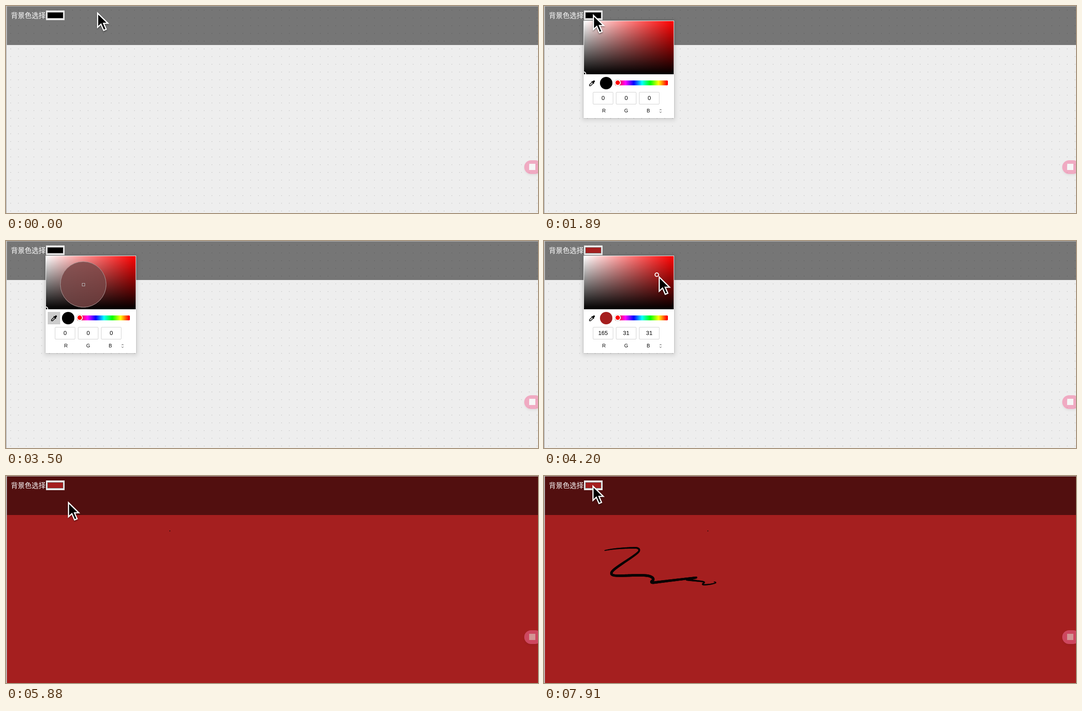
An HTML page with a canvas that plays this animation: 1198x467 px, repeating every 8 s.

```html
<!DOCTYPE html>
<html lang="zh-CN">
<head>
<meta charset="utf-8">
<title>背景色选择</title>
<style>
html, body { margin: 0; width: 100%; height: 100%; overflow: hidden; }
#stage { position: relative; width: 1198px; height: 467px; overflow: hidden; background: #eee; }
#stage * { position: absolute; box-sizing: border-box; }
#board { left: 0; top: 0; }
#header { left: 0; top: 0; width: 1198px; height: 88px; background: rgba(0,0,0,.5); }
#topline { left: 0; top: 0; width: 1198px; height: 1px; background: #bdbdbd; }
#edge { left: 0; top: 0; width: 2px; height: 467px; background: linear-gradient(90deg, #aaa 1px, #dcdcdc 1px); }
#label { left: 11px; top: 9px; font: 15.6px/23px "Noto Sans CJK SC", "Noto Sans CJK", sans-serif; color: #fff; white-space: nowrap; }
#input { left: 90px; top: 10px; width: 42px; height: 22px; background: #efefef; border: 1px solid #ddd; }
#swatch { left: 2px; top: 3px; width: 36px; height: 14px; border: 1px solid #777; }
#pill { left: 1167px; top: 348px; width: 40px; height: 31px; border-radius: 16px; background: #f26d9b; opacity: .52; box-shadow: 0 3px 5px rgba(0,0,0,.12); }
#pill i { left: 11px; top: 8px; width: 14px; height: 14px; background: #fff; }
#picker { left: 89px; top: 33px; width: 204px; height: 220px; background: #fff; box-shadow: 0 0 2px rgba(0,0,0,.35), 0 2px 9px 3px rgba(0,0,0,.11); font-family: "Liberation Sans", Arial, sans-serif; color: #000; }
.tone { background: linear-gradient(to top, #000, transparent), linear-gradient(to right, #fff, transparent), linear-gradient(red, red); background-repeat: no-repeat; }
#tone { left: 1px; top: 1px; width: 202px; height: 120px; overflow: hidden; }
#mark { width: 10px; height: 10px; margin: -5px; border: 2px solid #fff; border-radius: 50%; }
#dropper { left: 5px; top: 127px; width: 28px; height: 28px; }
#dropper svg { left: 0; top: 0; }
#sample { left: 37px; top: 127px; width: 28px; height: 28px; border-radius: 50%; }
#hue { left: 71px; top: 135px; width: 119px; height: 11px; border-radius: 2px; background: linear-gradient(90deg, red 4%, #f0f, #00f, #0ff, #0f0, #ff0, red 98%); }
#thumb { left: 70px; top: 133px; width: 14px; height: 14px; border: 2px solid #fff; border-radius: 50%; background: red; box-shadow: 0 0 2px rgba(0,0,0,.45); }
.field { top: 161px; width: 46px; height: 28px; border: 1px solid #d0d0d0; border-radius: 2px; font-size: 13px; line-height: 26px; text-align: center; }
.name { top: 196px; width: 20px; font-size: 11px; line-height: 14px; text-align: center; }
#arrows { left: 169px; top: 198px; }
#lens { left: 0; top: 0; width: 104px; height: 104px; border: 1px solid #a49696; border-radius: 50%; background-color: #ccc; background-size: 1212px 720px; }
#lens i { left: 48px; top: 48px; width: 7px; height: 7px; border: 1px solid #bbb; }
#cursor { left: 0; top: 0; overflow: visible; filter: drop-shadow(0 2px 1.5px rgba(0,0,0,.4)); }
</style>
</head>
<body>
<div id="stage">
  <canvas id="board" width="1198" height="467"></canvas>
  <div id="header"></div>
  <div id="topline"></div>
  <div id="edge"></div>
  <div id="label">背景色选择</div>
  <div id="input"><div id="swatch"></div></div>
  <div id="pill"><i></i></div>
  <div id="picker">
    <div id="tone" class="tone"><div id="mark"></div></div>
    <div id="dropper"><svg width="28" height="28" fill="none" stroke="#000" stroke-width="1.5">
      <path d="M14.5 11.5 L8.5 17.5 V20 H11 L17 14"/>
      <path d="M13.5 10 L18.5 15 M16 12.5 L18.5 10" stroke-width="2.2"/>
      <path d="M17 11.5 L18.6 9.9" stroke-width="4" stroke-linecap="round"/></svg></div>
    <div id="sample"></div>
    <div id="hue"></div>
    <div id="thumb"></div>
    <svg id="arrows" width="10" height="12" fill="none" stroke="#222"><path d="M2.5 4 L4.5 2 L6.5 4 M2.5 7.5 L4.5 9.5 L6.5 7.5"/></svg>
  </div>
  <div id="lens" class="tone"><i></i></div>
  <svg id="cursor" width="30" height="48"><path d="M1.3 3.2 V35 L8.8 28 L14.9 42 L20.6 39.5 L14.7 26 H24.5 Z" stroke="#fff" stroke-width="2.6"/></svg>
</div>
<script>
const LOOP = 8000, TICK = 70;
const OPEN = 1890, HOVER = 2870, LENS = 3080, PICK = 3920, CLOSE = 5040, FILL = 5110;
const DRAW = 6370, DONE = 7070;
const RED = [165, 31, 31], BLACK = [0, 0, 0];
const $ = id => document.getElementById(id);
const ctx = $('board').getContext('2d');
const rgb = c => `rgb(${c})`;
const show = (el, on) => el.style.visibility = on ? 'visible' : 'hidden';
const place = (el, x, y) => el.style.transform = `translate(${x}px,${y}px)`;

const fields = [...'RGB'].map((letter, i) => {
  const add = (cls, left, text) => {
    const el = document.createElement('div');
    el.className = cls;
    el.style.left = left + 'px';
    el.textContent = text;
    return $('picker').appendChild(el);
  };
  add('name', 36 + 50 * i, letter);
  return add('field', 21 + 52 * i, 0);
});

// time, x, y of the pointer tip
const pointer = [
  [0, 205, 13], [70, 202, 13], [700, 110, 18], [2170, 110, 18], [2450, 150, 105], [2660, 154, 168],
  [2800, 128, 184], [2940, 106, 172], [3080, 106, 172]
];
const lensPath = [[3080, 108, 170], [3500, 174, 98], [3850, 255, 77], [3920, 255, 77]];
const leave = [[3920, 255, 77], [4130, 255, 77], [4830, 368, 121], [5460, 368, 121],
  [5880, 139.5, 57], [6300, 136, 147], [6370, 137, 165]];
const back = [[7070, 386, 236], [7140, 402, 228], [7420, 285, 130], [7840, 109, 20], [8000, 109, 20]];

// Smooth path through timed points; the tangent is flat wherever the pointer rests.
function along(points, t) {
  const last = points.length - 1;
  if (t <= points[0][0]) return points[0].slice(1);
  if (t >= points[last][0]) return points[last].slice(1);
  const i = points.findIndex(p => p[0] > t) - 1;
  const a = points[i], b = points[i + 1], span = b[0] - a[0], u = (t - a[0]) / span;
  const slope = (k, d) => {
    const p = points[k - 1], c = points[k], n = points[k + 1];
    if (!p || !n || p[d] === c[d] || c[d] === n[d]) return 0;
    return (n[d] - p[d]) / (n[0] - p[0]);
  };
  return [1, 2].map(d =>
    a[d] + (b[d] - a[d]) * u * u * (3 - 2 * u) +
    span * u * (1 - u) * ((1 - u) * slope(i, d) - u * slope(i + 1, d)));
}

const ink = document.createElementNS('http://www.w3.org/2000/svg', 'path');
ink.setAttribute('d', `M137 168 C160 163 190 162 206 162 C215 162 217 168 211 173
  C195 187 160 206 153 216 C148 224 158 225 168 225 C190 225 225 222 238 226
  C249 230 247 235 242 238 C241 242 247 240.5 255 239.5 L343 229 C335 232 327 233 321 234
  C335 236 355 237 360 239 C364 241 354 243 358 245 C365 246 380 244 387 241 Q387 239 383 239`);
const inkLength = ink.getTotalLength();
const stamps = Array.from({ length: Math.ceil(inkLength) }, (_, s) => {
  const p = ink.getPointAtLength(s);
  return [p.x, p.y, 1 + 1.9 * Math.sin(Math.PI * s / inkLength) ** .8];
});

function dot(x, y, r) {
  ctx.beginPath();
  ctx.arc(x, y, r, 0, 7);
  ctx.fill();
}

function paintBoard(t) {
  ctx.clearRect(0, 0, 1198, 467);
  if (t < FILL) {
    ctx.fillStyle = '#b4b4b4';
    for (let y = 9.6; y < 467; y += 17.42)
      for (let x = 10.5; x < 1198; x += 17.43) dot(x, y, .75);
    return;
  }
  ctx.fillStyle = rgb(RED);
  ctx.fillRect(0, 0, 1198, 467);
  ctx.fillStyle = '#0a0505';
  dot(369, 124, .9);
  const drawn = Math.min(1, (t - DRAW) / (DONE - DRAW)) * stamps.length;
  for (let s = 0; s < drawn; s++) dot(...stamps[s]);
}

function pointerAt(t) {
  if (t < PICK) return along(pointer, t);
  if (t < DRAW) return along(leave, t);
  if (t >= DONE) return along(back, t);
  const p = ink.getPointAtLength((t - DRAW) / (DONE - DRAW) * inkLength);
  return [p.x - 1, p.y - 3];
}

function render(t) {
  const picked = t >= PICK, color = picked ? RED : BLACK;
  const lensOn = t >= LENS && t < PICK;
  paintBoard(t);
  show($('picker'), t >= OPEN && t < CLOSE);
  show($('lens'), lensOn);
  show($('cursor'), !lensOn);
  $('swatch').style.background = $('sample').style.background = rgb(color);
  $('dropper').style.background = t >= HOVER && t < PICK ? '#ccc' : 'none';
  fields.forEach((f, i) => f.textContent = color[i]);
  place($('mark'), ...(picked ? [164, 42] : [0, 119]));
  place($('cursor'), ...pointerAt(t));
  if (lensOn) {
    const [x, y] = along(lensPath, t);
    place($('lens'), x - 52, y - 52);
    $('lens').style.backgroundPosition = `${51 - (x - 90) * 6}px ${51 - (y - 34) * 6}px`;
  }
}

const start = performance.now();
let shown = -1;
function loop() {
  const t = Math.floor((performance.now() - start) % LOOP / TICK) * TICK;
  if (t !== shown) render(shown = t);
  requestAnimationFrame(loop);
}
loop();
</script>
</body>
</html>
```
